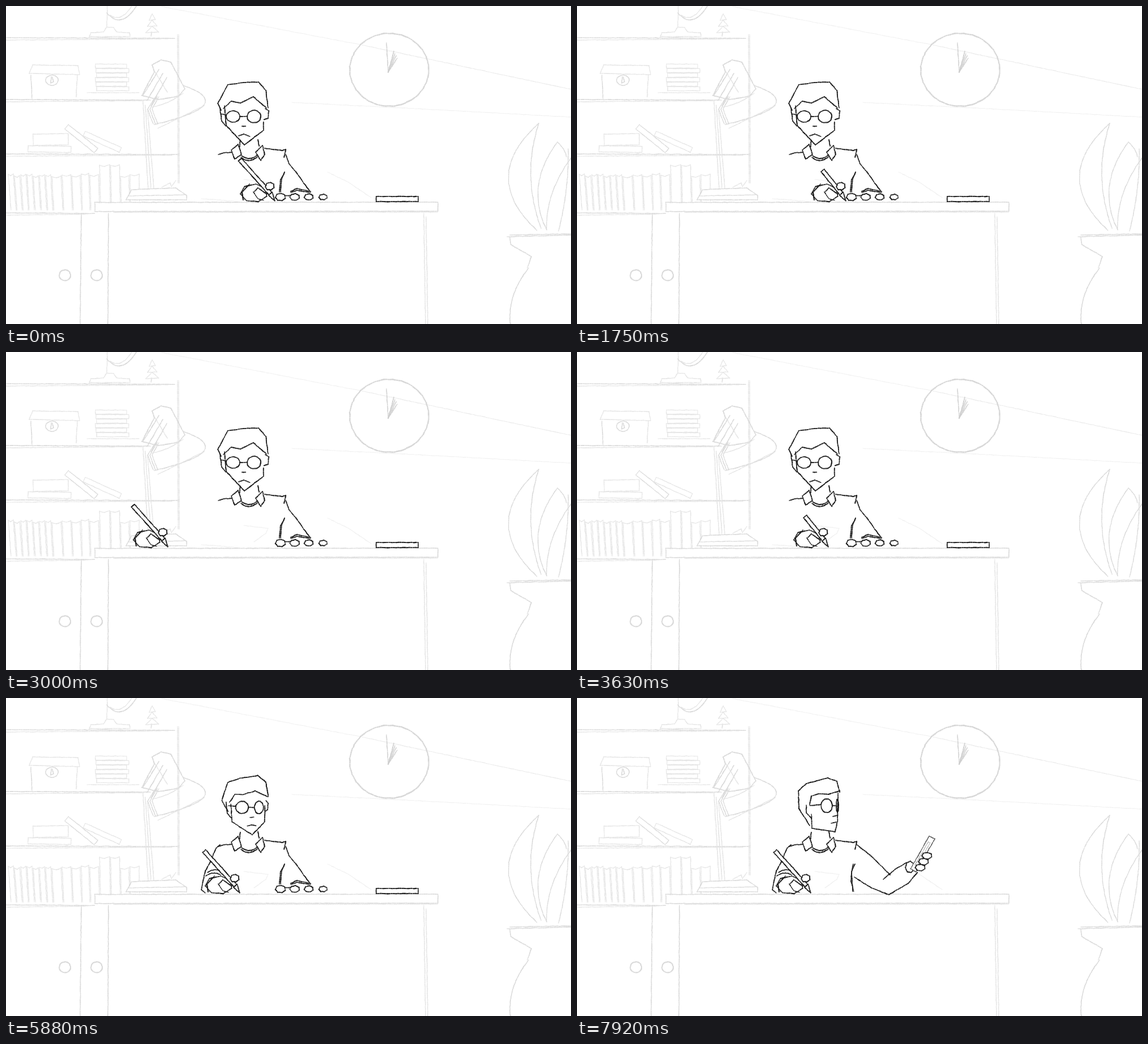
Write an HTML page with a canvas that moves like this. It is 998 px wide and 561 px high and loops after 8000 ms.

```html
<!DOCTYPE html>
<html lang="en">
<head>
<meta charset="utf-8">
<title>Desk sketch</title>
<style>
html, body { margin: 0; width: 100%; height: 100%; overflow: hidden; background: #fff; }
canvas { display: block; width: 998px; height: 561px; }
</style>
</head>
<body>
<canvas id="stage" width="998" height="561"></canvas>
<script>
const W = 998, H = 561, LOOP = 8000, PAPER = '#fff', INK = '#161616';
const PALE = '#efefef', SOFT = '#e4e4e4', MID = '#d9d9d9', DARK = '#cfcfcf';
const stage = document.getElementById('stage').getContext('2d');
const room = document.createElement('canvas');
room.width = W;
room.height = H;
let ctx = room.getContext('2d');

// ---- pencil ----
const lerp = (a, b, t) => a + (b - a) * t;
const mix = (a, b, t) => a.map((v, i) => lerp(v, b[i], t));

function random(seed) {
  let s = Math.floor(seed * 97) + 12345;
  return () => {
    s = (s + 0x6d2b79f5) | 0;
    let r = Math.imul(s ^ (s >>> 15), 1 | s);
    r = (r + Math.imul(r ^ (r >>> 7), 61 | r)) ^ r;
    return ((r ^ (r >>> 14)) >>> 0) / 4294967296;
  };
}

// Short pieces with a slightly uneven path, weight and pressure.
function line(p, color = INK, width = 1.8) {
  const rnd = random(p[2] - p[0] + 3 * (p[3] - p[1]) + p.length);
  ctx.strokeStyle = color;
  ctx.lineCap = 'round';
  let [x, y] = p;
  for (let i = 2; i < p.length; i += 2) {
    const steps = Math.max(1, Math.round(Math.hypot(p[i] - p[i - 2], p[i + 1] - p[i - 1]) / 4));
    for (let j = 1; j <= steps; j++) {
      const nx = lerp(p[i - 2], p[i], j / steps) + (rnd() - 0.5) * 0.7;
      const ny = lerp(p[i - 1], p[i + 1], j / steps) + (rnd() - 0.5) * 0.7;
      ctx.lineWidth = width * (0.8 + rnd() * 0.4);
      ctx.globalAlpha = 0.75 + rnd() * 0.25;
      ctx.beginPath();
      ctx.moveTo(x, y);
      ctx.lineTo(nx, ny);
      ctx.stroke();
      x = nx;
      y = ny;
    }
  }
  ctx.globalAlpha = 1;
}

function shape(p, color, width) {
  ctx.beginPath();
  for (let i = 0; i < p.length; i += 2) ctx.lineTo(p[i], p[i + 1]);
  ctx.fillStyle = PAPER;
  ctx.fill();
  line([...p, p[0], p[1]], color, width);
}

// A bar of the given thickness around the line from one end to the other.
function bar(x1, y1, x2, y2, thick, color, width) {
  const k = thick / 2 / Math.hypot(x2 - x1, y2 - y1);
  const nx = (y1 - y2) * k, ny = (x2 - x1) * k;
  shape([x1 + nx, y1 + ny, x2 + nx, y2 + ny, x2 - nx, y2 - ny, x1 - nx, y1 - ny], color, width);
}

function ring(cx, cy, rx, ry, corners) {
  const p = [];
  for (let i = 0; i < corners; i++) {
    const a = (i + 0.4) / corners * Math.PI * 2;
    p.push(cx + rx * Math.cos(a), cy + ry * Math.sin(a));
  }
  return p;
}

function oval(cx, cy, rx, ry, color, width) {
  const p = ring(cx, cy, rx, ry, 28);
  line([...p, p[0], p[1]], color, width);
}

const blob = (cx, cy, rx, ry) => shape(ring(cx, cy, rx, ry, 7));

// A bow between two points, pushed sideways (and down) in the middle.
function bow(x1, y1, x2, y2, side, down = 0, color = MID, width = 1.4) {
  const p = [];
  for (let i = 0; i <= 16; i++) {
    const t = i / 16, push = 4 * t * (1 - t);
    p.push(lerp(x1, x2, t) + side * push, lerp(y1, y2, t) + down * push);
  }
  line(p, color, width);
}

// ---- room ----
function drawBooks() {
  const rnd = random(7);
  for (let x = 4; x < 235;) {
    const w = x < 80 ? 9 : 13 + rnd() * 5;
    const top = Math.abs(x - 88) < 6 ? 275 : Math.abs(x - 180) < 16 ? 281 : 296 + rnd() * 6;
    const foot = x < 200 ? 360 : 345, lean = 5 - x / 50;
    line([x + lean, foot, x, top, x + w / 2, top + 2, x + w, top - 1, x + w + lean, foot], SOFT, 1.3);
    x += w + 2;
  }
}

function drawShelves() {
  [[57, 298], [166, 255], [262, 305], [366, 157]].forEach(([y, end]) => {
    line([0, y - 1, end, y], MID, 1.5);
    line([0, y + 3, end - 12, y + 1], SOFT, 1.3);
  });
  for (let i = 0; i < 2; i++) {
    line([303 + i * 2, 50, 304 + i * 2, 312], SOFT, 1.4);
    line([133 + i * 48, 366, 131 + i * 49, 561], MID, 1.6);
    oval(104 + i * 56, 475, 10, 9.5, MID, 2);
  }
  // chest, paper stack, lying and leaning books
  shape([41, 119, 47, 104, 127, 105, 130, 121], SOFT, 1.4);
  line([44, 122, 46, 165], MID, 1.4);
  line([126, 122, 124, 160], SOFT, 1.4);
  oval(81, 131, 11, 9, MID, 1.4);
  line([80, 125, 79, 136, 84, 134, 82, 125], DARK, 1.3);
  for (let i = 0; i < 6; i++) bar(158 + i % 3, 106 + i * 8, 213 + i % 2 * 4, 106 + i * 8, 7, SOFT, 1.2);
  line([143, 153, 235, 153], SOFT, 1.2);
  bar(39, 252, 115, 253, 11, SOFT, 1.3);
  bar(48, 236, 110, 235, 20, SOFT, 1.3);
  bar(107, 213, 159, 255, 10, MID, 1.3);
  bar(138, 225, 202, 254, 9, SOFT, 1.3);
  drawBooks();
  // globe and little tree
  line([147, 54, 150, 47, 172, 46, 178, 37, 190, 38, 196, 46, 218, 47, 219, 54, 147, 54], SOFT, 1.4);
  line([178, 36, 179, 0], SOFT, 1.4);
  bow(178, 12, 230, 0, 0, 18, MID, 1.6);
  bow(184, 16, 222, 0, 0, 11, SOFT, 1.3);
  for (let i = 0; i < 3; i++) {
    const y = 14 + i * 11;
    line([253 - i * 3, y + 11, 258, y, 264 + i * 3, y + 10, 253 - i * 3, y + 11], SOFT, 1.3);
  }
  line([257, 46, 256, 53], SOFT, 2);
}

function drawLamp() {
  for (let i = 0; i < 3; i++) {
    line([242 + i * 4, 168 + i * 7, 251 + i * 5, 322], SOFT, 1.5);
    line([270 + i * 7, 112 + i * 7, 242 + i * 7, 158 + i * 9], MID, 1.6);
    line([264 + i * 3, 160, 250 + i * 4, 182, 260 + i * 4, 208], MID, 1.4);
  }
  line([240, 158, 262, 116, 258, 104, 274, 95, 291, 99, 316, 146, 305, 159, 270, 165, 240, 158], MID, 1.7);
  line([262, 114, 285, 152], SOFT, 1.4);
  bow(313, 140, 262, 209, 62, 0, MID, 1.5);
  bow(313, 154, 258, 178, 0, 4, SOFT);
  line([350, 176, 268, 216], SOFT, 1.3);
  shape([212, 342, 222, 324, 300, 321, 319, 334, 319, 342], MID, 1.5);
  line([217, 335, 318, 333], MID, 1.3);
  line([275, 320, 290, 312, 292, 319, 300, 308], SOFT, 1.3);
}

function drawPlant() {
  // tip x, tip y, foot x, foot y, bulge
  [[941, 207, 938, 396, -52], [941, 207, 945, 392, -16], [974, 240, 955, 395, -24],
    [998, 268, 955, 394, -12], [993, 252, 976, 397, 5], [974, 240, 990, 266, 3]
  ].forEach(leaf => bow(...leaf));
  for (let i = 0; i < 2; i++) line([885 + i * 5, 407 - i * 3, 998, 404 - i * 2], MID, 1.5);
  line([890, 408, 892, 421, 928, 442, 921, 462], MID, 1.6);
  bow(923, 462, 891, 561, -11, 0, MID, 1.6);
}

function drawRoom() {
  ctx.fillStyle = PAPER;
  ctx.fillRect(0, 0, W, H);
  line([275, 1, 630, 69], PALE, 1);
  line([630, 69, 998, 147], '#e9e9e9', 1.1);
  line([505, 170, 740, 182, 998, 196], PALE, 1);
  oval(677, 112.5, 70, 64.5, '#d6d6d6', 2.2);
  line([672, 65, 675, 116], DARK, 1.5);
  for (let i = 0; i < 4; i++) line([675, 117, 685 + i * 2, 80 + i * 4], DARK, 1.6);
  drawShelves();
  drawLamp();
  bar(157, 354.5, 763, 354, 16, MID, 1.6);
  line([190, 364, 762, 364], SOFT, 1.2);
  for (let i = 0; i < 2; i++) line([738 + i * 4, 366 + i * 6, 741 + i * 4, 561], SOFT, 1.5);
  line([345, 340, 402, 344], PALE, 1.2);
  line([568, 293, 605, 311, 645, 338], PALE, 1.2);
  drawPlant();
}

// ---- figure ----
// Each part of the head facing front and facing the phone.
const head = [
  [[380, 184, 374, 172, 392, 139, 419, 135, 446, 134, 459, 149, 463, 180],
    [411, 225, 392, 195, 391, 164, 405, 151, 443, 141, 459, 147, 464, 166]],
  [[384, 181, 398, 168, 414, 171, 437, 160, 460, 180], [411, 188, 414, 173, 426, 169, 444, 170, 464, 164]],
  [[386, 176, 389, 211, 421, 245, 455, 219, 455, 205], [414, 205, 415, 230, 456, 236, 460, 218, 461, 168]],
  [[378, 180, 381, 203, 388, 212], [405, 189, 405, 203, 414, 212]],
  [[458, 181, 464, 185, 463, 198, 456, 200], [461, 181, 461, 187, 461, 195, 460, 200]],
  [[417, 212, 423, 212], [452, 209, 460, 207]],
  [[411, 229, 420, 226, 431, 230], [449, 221, 453, 220, 458, 219]]
];

function drawHead(turn) {
  head.forEach(([front, side]) => line(mix(front, side, turn)));
  const x1 = lerp(401, 441, turn), x2 = lerp(438, 460, turn);
  const r1 = 12 - 2 * turn, r2 = 12 - 10 * turn, y = 195 - 5 * turn;
  oval(x1, y, r1, 10 + 2 * turn);
  oval(x2, y, r2, 11);
  line([x1 + r1, y, x2 - r2, y]);
  line([x1 - r1, y - 2, lerp(380, 411, turn), 190]);
}

function drawBody() {
  line([414, 237, 412, 251]);
  line([445, 236, 447, 247]);
  shape([410, 244, 398, 254, 404, 270, 416, 262]);
  shape([453, 246, 441, 258, 450, 272, 457, 262]);
  for (let i = 0; i < 2; i++) bow(415, 263 + i * 4, 444, 263 + i * 3, 0, 6, INK, 1.8);
  line([375, 262, 385, 259, 399, 258]);
  line([457, 251, 488, 255, 494, 253, 491, 267]);
  line([420, 306, 463, 311, 459, 320, 438, 335], PALE, 1.2);
}

function drawPenHand(tip, lean, y = 344) {
  blob(tip - 37, y - 14, 24, 16);
  line([tip - 56, y - 2, tip - 58, y - 15, tip - 45, y - 30]);
  line([tip - 36, y - 17, tip - 30, y - 23, tip - 14, y - 12]);
  line([tip - 38, y - 16, tip - 30, y - 4, tip - 20, y - 1], INK, 1.5);
  bar(tip - lean, y - 16 - lean * 0.92, tip - 8, y - 13, 7);
  line([tip - 11, y - 10, tip, y, tip - 5, y - 16]);
  blob(tip - 9, y - 26, 8, 7);
}

// Quick sweeps along the sheet; every second row starts a little to the left.
const sweep = [465, 434, 345, 296, 355, 424, 530];

function drawWriting(k) {
  const row = Math.floor(k / 7) % 2 ? -10 : 10;
  const tip = Math.min(sweep[k % 7] + row, k > 28 ? 487 : W);
  const raised = k % 7 === 2 ? 304 : 344;
  drawPenHand(tip, 52 + 12 * Math.cos(k * Math.PI * 2 / 3 - 0.6), raised);
}

function drawRestingPen() {
  line([378, 259, 371, 265, 365, 279]);
  line([362, 287, 352, 305, 345, 338, 352, 344]);
  for (let i = 0; i < 2; i++) bow(356 - i * 3, 308 + i * 6, 379, 306 + i * 6, 0, -4, INK, 1.5);
  drawPenHand(413, 63);
}

function drawRestingArm() {
  line([494, 262, 500, 278, 512, 293, 536, 326]);
  for (let i = 0; i < 2; i++) {
    line([492, 293, 485 + i * 2, 306, 483 + i * 2, 328], INK, 1.6);
    line([503, 327 + i * 2, 514, 322 + i * 3, 538, 327 + i * 2]);
  }
  for (let i = 0; i < 4; i++) blob(485 + i * 25, 337, 9 - i * 0.5, 6.5 - i * 0.5);
  line([492, 335, 503, 334]);
}

function drawSleeve() {
  for (let i = 0; i < 2; i++) line([491 - i * 3, 293, 485, 306, 484 + i * 2, 323, 489 - i * 2, 341], INK, 1.5);
}

function drawReach(t) {
  const dx = 125 * t, dy = 10 * t;
  drawSleeve();
  bow(493, 259, 527 + dx, 309 + dy, -2, 0, INK, 1.8);
  line([492, 317, 507 + dx, 331 + dy]);
  ctx.save();
  ctx.translate(dx, dy);
  shape([527, 309, 545, 301, 567, 298, 580, 315, 581, 328, 578, 339, 560, 333, 545, 336, 525, 332]);
  for (let i = 0; i < 3; i++) line([546 + i * 2, 314 - i * 5, 562 + i * 2, 324 - i * 9, 580, 337 - i * 10]);
  line([546, 314, 540, 326, 556, 325]);
  blob(515, 327, 13, 7);
  line([510, 334, 514, 343]);
  ctx.restore();
}

const lying = [654, 340.5, 728, 340.5], held = [594, 304, 627, 246];

function drawLift(t) {
  const phone = mix(lying, held, t), [x, y] = phone;
  const elbow = lerp(600, 551, t);
  drawSleeve();
  line([493, 258, 520, 279, elbow + 2, 312]);
  line([elbow - 10, 320, elbow + 11, 302, x - 11, y - 14]);
  line([490, 316, 520, 335, elbow, 347, x - 9, y + 23, x + 7, y + 4]);
  blob(x - 6, y - 6, 8, 10);
  bar(...phone, 11, '#555', 1.5);
  bar(...mix(phone, [phone[2], phone[3], x, y], 0.15), 4, '#aaa', 1.2);
  for (let i = 0; i < 3; i++) {
    const at = 0.46 - i * 0.18;
    blob(lerp(x, phone[2], at) + 9, lerp(y, phone[3], at) + 1, 9, 6);
  }
}

// ---- timeline ----
const step = (t, start, last) => Math.min(last, Math.floor((t - start + 10) / 83));

function pose(t) {
  return {
    write: Math.min(35, Math.floor(t / 125)),
    turn: step(t, 5880, 4),
    reach: step(t, 7000, 4),
    raise: step(t, 7500, 5)
  };
}

function draw({ write, turn, reach, raise }) {
  ctx.drawImage(room, 0, 0);
  drawBody();
  drawHead(turn < 0 ? 0 : lerp(0.4, 1, turn / 4));
  if (raise < 0) bar(...lying, 9);
  if (raise >= 0) drawLift(raise / 5);
  else if (reach >= 0) drawReach(reach / 4);
  else drawRestingArm();
  if (turn < 0) drawWriting(write);
  else drawRestingPen();
}

drawRoom();
ctx = stage;
const start = performance.now();
let shown = '';

function tick() {
  const now = pose((performance.now() - start) % LOOP);
  const key = Object.values(now).join();
  if (key !== shown) {
    shown = key;
    draw(now);
  }
  requestAnimationFrame(tick);
}
tick();
</script>
</body>
</html>
```
